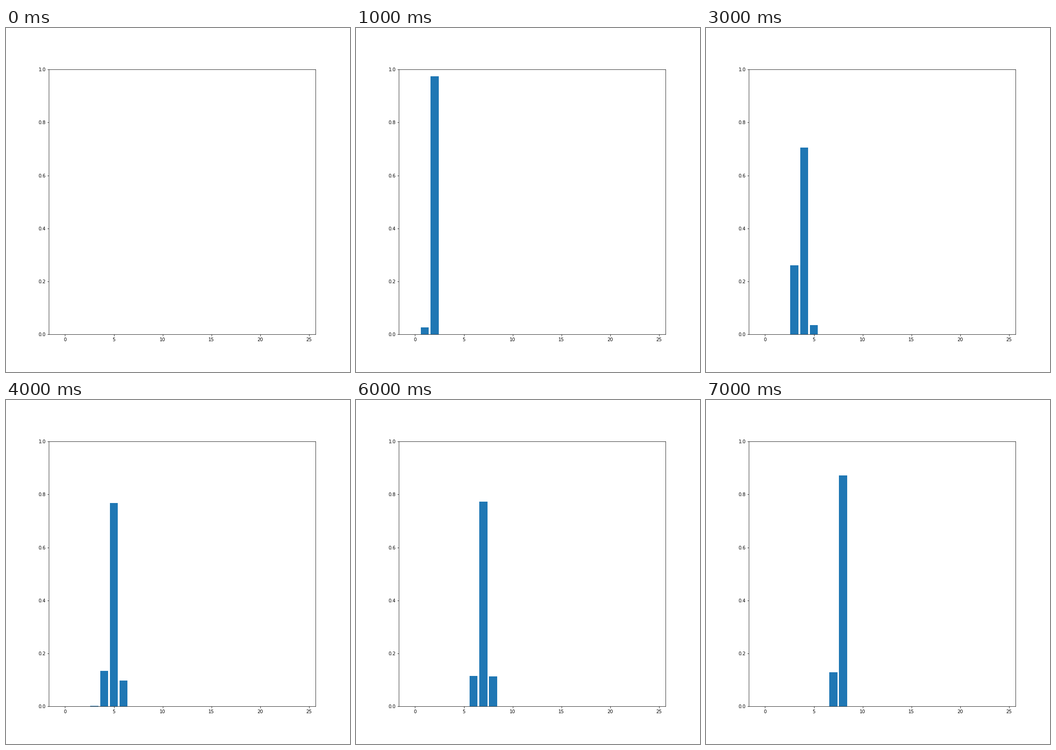
A matplotlib script that plays this animation: 748 px wide and 748 px high, repeating every 8 s.

```python
import numpy as np
import matplotlib.pyplot as plt
from matplotlib.animation import FuncAnimation

# Bayes filter on a 1-D track: a robot moves one cell per step and
# measures the distances to all landmarks ahead of it.
CELLS = np.arange(25)
LANDMARKS = np.array([3, 9, 14, 23])
STEPS = 8

STAGE = 748
DPI = 72
LAYOUT = 10.38 * DPI / STAGE  # the plot layout is a little smaller than the stage


def gauss(d):
    return np.exp(-0.5 * np.asarray(d, dtype=float) ** 2)


def ranges(cell):
    d = LANDMARKS - cell
    return d[d > 0]


def likelihood(cell, seen):
    expected = ranges(cell)
    if len(expected) < len(seen):
        return 0.0
    return gauss(seen - expected[:len(seen)]).prod()


def run_filter():
    """Belief per step; the chart is empty before the first measurement."""
    near = np.abs(CELLS[:, None] - LANDMARKS).min(axis=1) <= 1
    belief = near / near.sum()
    motion = gauss(CELLS[:, None] - CELLS - 1)
    history = [np.zeros(len(CELLS))]
    for step in range(1, STEPS):
        pos = step + 1
        seen = LANDMARKS[LANDMARKS >= pos] - pos
        belief = motion @ belief * [likelihood(c, seen) for c in CELLS]
        belief = belief / belief.sum()
        history.append(belief)
    return history


history = run_filter()

fig = plt.figure(figsize=(STAGE / DPI, STAGE / DPI), dpi=DPI)
ax = fig.add_axes([0.125 * LAYOUT, 0.11 * LAYOUT, 0.775 * LAYOUT, 0.77 * LAYOUT])
bars = ax.bar(CELLS, np.zeros(len(CELLS)), width=0.82, color="#1f77b4")
ax.set_ylim(0, 1)


def draw(i):
    for bar, height in zip(bars, history[i]):
        bar.set_height(height)
    return list(bars)


anim = FuncAnimation(fig, draw, frames=STEPS, interval=1000,
                     repeat=True, repeat_delay=0)
plt.show()
```
